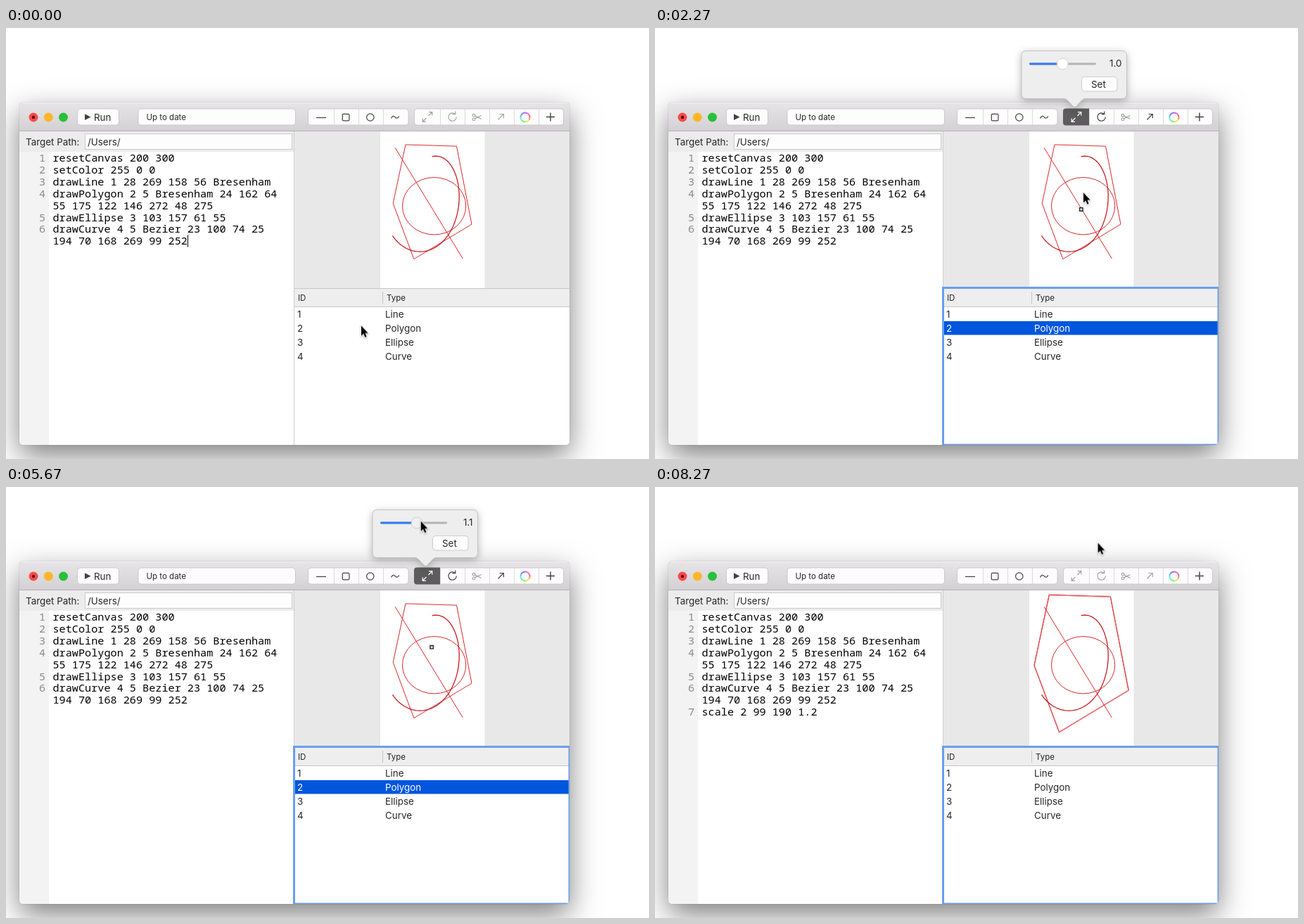
Write an HTML page that moves like this. It is 914 px wide and 613 px high and loops after 8940 ms.

```html
<!DOCTYPE html>
<html lang="en">
<head>
<meta charset="utf-8">
<title>Drawing script editor</title>
<style>
  html, body { margin: 0; width: 100%; height: 100%; overflow: hidden; background: #fff; }
  .window {
    position: absolute; left: 19px; top: 106px; width: 782px; height: 487px;
    border-radius: 5px; background: #fff;
    box-shadow: 0 0 1px rgba(0,0,0,.55), 0 15px 42px rgba(0,0,0,.5);
  }
  svg { position: absolute; left: 0; top: 0; display: block; }
  text { font: 13.4px Inter, "Open Sans", sans-serif; fill: #262626; white-space: pre; }
  .small { font-size: 11.5px; }
  .code text { font: 15.2px "Noto Sans Mono", "DejaVu Sans Mono", monospace; fill: #000; }
  .code .num { fill: #8a8a8a; text-anchor: end; }
  .box { fill: #fdfdfd; stroke: #c3c1c3; stroke-width: .8; }
  .icon { fill: none; stroke: currentColor; stroke-width: 1.2; color: #404040; }
  .off { color: #a3a3a3; }
  .red { fill: none; stroke: #d7262b; }
  .red * { vector-effect: non-scaling-stroke; }
  .end { text-anchor: end; }

  /* 1% = 89.4 ms */
  .a { animation: 8940ms step-end infinite; }
  .caret { animation-name: caret; }
  .row { animation-name: row; }
  .rowText text { fill: currentColor; }
  .rowText { animation-name: rowText; }
  .tool { animation-name: tool; }
  .scaleTool { animation-name: scaleTool; }
  .pressed { animation-name: pressed; }
  .before { animation-name: before; }
  .after { animation-name: after; }
  .v0 { animation-name: v0; }
  .v1 { animation-name: v1; }
  .v2 { animation-name: v2; }
  .set { animation-name: set; }
  .knob { animation: grab 8940ms step-end infinite, slide 8940ms ease-out infinite; }
  .ring { animation: ring 8940ms ease-out infinite; }
  .popover { animation: popover 8940ms linear infinite; transform-origin: 597px 113px; }
  .handle { animation: handle 8940ms ease-in-out infinite, pressed 8940ms step-end infinite; }
  .cursor { animation: cursor 8940ms ease-in-out infinite; }

  @keyframes caret { 0% { opacity: 1 } 1.45%, 100% { opacity: 0 } }
  @keyframes row { 0% { opacity: 0 } 4.47% { opacity: 1 } 83.5%, 100% { opacity: 0 } }
  @keyframes rowText { 0% { color: #262626 } 4.47% { color: #fff } 83.5%, 100% { color: #262626 } }
  @keyframes tool { 0% { color: #a3a3a3 } 4.47% { color: #404040 } 83.5%, 100% { color: #a3a3a3 } }
  @keyframes scaleTool {
    0% { color: #a3a3a3 } 4.47% { color: #404040 } 18.6% { color: #fff } 83.5%, 100% { color: #a3a3a3 }
  }
  @keyframes pressed { 0% { opacity: 0 } 18.6% { opacity: 1 } 83.5%, 100% { opacity: 0 } }
  @keyframes before { 0% { opacity: 1 } 83.5%, 100% { opacity: 0 } }
  @keyframes after { 0% { opacity: 0 } 83.5%, 100% { opacity: 1 } }
  @keyframes v0 { 0% { opacity: 1 } 61.9%, 100% { opacity: 0 } }
  @keyframes v1 { 0% { opacity: 0 } 61.9% { opacity: 1 } 66.8%, 100% { opacity: 0 } }
  @keyframes v2 { 0% { opacity: 0 } 66.8%, 100% { opacity: 1 } }
  @keyframes set { 0% { opacity: 0 } 82.6%, 100% { opacity: 1 } }
  @keyframes grab { 0% { fill: #fff } 60.35% { fill: #f0f0f0 } 72.3%, 100% { fill: #fff } }
  @keyframes slide {
    0%, 60.35% { transform: translate(579.3px, 51px) }
    63.42% { transform: translate(584px, 51px) }
    70.1%, 100% { transform: translate(585.7px, 51px) }
  }
  @keyframes ring {
    0%, 4.4% { opacity: 0; stroke-width: 22px }
    7.5%, 100% { opacity: 1; stroke-width: 3px }
  }
  @keyframes popover {
    0%, 18.6% { opacity: 0; transform: scale(.6) }
    20.1% { opacity: 1; transform: scale(1.05) }
    21.4%, 83.5% { opacity: 1; transform: none }
    85%, 100% { opacity: 0; transform: none }
  }
  @keyframes handle {
    0%, 31.5% { transform: translate(605.8px, 258px) }
    41.05%, 43% { transform: translate(605.4px, 221.3px) }
    46.98%, 100% { transform: translate(605.2px, 227.7px) }
  }
  @keyframes cursor {
    0%, 9.2% { transform: translate(505px, 423.5px) }
    15.6%, 20.5% { transform: translate(602.4px, 125px) }
    25.39% { transform: translate(609px, 234px); animation-timing-function: ease-out }
    28.5%, 31.5% { transform: translate(606px, 258px) }
    41.05%, 43% { transform: translate(605.6px, 220.5px) }
    46.98%, 49.5% { transform: translate(605.4px, 226.9px) }
    59.6%, 60.35% { transform: translate(585px, 48.6px); animation-timing-function: ease-out }
    63.42% { transform: translate(589.7px, 48.6px); animation-timing-function: ease-out }
    70.1%, 75% { transform: translate(591.4px, 49px) }
    82%, 99.99% { transform: translate(629.6px, 79.5px) }
    100% { transform: translate(505px, 423.5px) }
  }
</style>
</head>
<body>
<div class="window"></div>
<svg width="914" height="613" viewBox="0 0 914 613">
  <defs>
    <linearGradient id="bar" x2="0" y2="1"><stop stop-color="#e7e5e7"/><stop offset="1" stop-color="#d2d0d2"/></linearGradient>
    <linearGradient id="blue" x2="0" y2="1"><stop stop-color="#4a97f9"/><stop offset="1" stop-color="#0a5ae0"/></linearGradient>
    <clipPath id="frame"><rect x="19" y="106" width="782" height="487" rx="5"/></clipPath>
  </defs>

  <g clip-path="url(#frame)">
    <rect x="19" y="106" width="782" height="41" fill="url(#bar)"/>
    <path d="M19 106.5H801" stroke="#f3f2f3"/>
    <path d="M19 146.5H801" stroke="#b4b2b4"/>

    <!-- script side -->
    <rect x="19" y="147" width="391" height="29" fill="#ececec"/>
    <text x="28" y="166.5">Target Path:</text>
    <rect class="box" x="112.5" y="150.5" width="294" height="22"/>
    <text x="116" y="166.5">/Users/</text>
    <rect x="19" y="176" width="42" height="417" fill="#f3f3f3"/>
    <g class="code" id="code"></g>
    <path class="a caret" d="M258.5 294.5V311.5" stroke="#000"/>

    <!-- canvas -->
    <rect x="410" y="147" width="391" height="223" fill="#e8e8e8"/>
    <rect x="532" y="147" width="148.500" height="223" fill="#fff"/>
    <g class="red" transform="translate(532.4 369.4) scale(.74 -.74)">
      <path d="M28 269L158 56"/>
      <path id="poly" class="a before" d="M24 162L64 55 175 122 146 272 48 275Z"/>
      <g class="a after"><use href="#polyBig"/>
        <path id="polyBig" d="M24 162L64 55 175 122 146 272 48 275Z"
          transform="translate(99 190) scale(1.2) translate(-99 -190)"/></g>
      <ellipse cx="103" cy="157" rx="61" ry="55"/>
      <path id="curve" stroke="#c4151b" stroke-width="1.25"/>
    </g>

    <!-- table -->
    <rect x="410" y="370" width="391" height="223" fill="#fff"/>
    <rect x="410" y="371" width="391" height="25" fill="#eee"/>
    <path d="M410 370.5H801M410 396.500H801M535.500 375V392" stroke="#c6c6c6"/>
    <path d="M409.500 147V593" stroke="#cfcfcf"/>
    <text class="small" x="415" y="387.500">ID</text>
    <text class="small" x="541" y="387.500">Type</text>
    <rect class="a row" x="410" y="417" width="391" height="19.500" fill="#0056dc"/>
    <g id="rows"></g>
    <rect class="ring" x="409.500" y="369.500" width="391.500" height="223.500" fill="none" stroke="#6a9eee"/>
  </g>

  <!-- title bar -->
  <circle cx="39" cy="127" r="6.500" fill="#fc4a48"/><circle cx="39" cy="127" r="2.200" fill="#5a0406"/>
  <circle cx="60.300" cy="127" r="6.500" fill="#fdb629"/>
  <circle cx="81.500" cy="127" r="6.500" fill="#27c13b"/>
  <rect class="box" x="101.500" y="115" width="59" height="23" rx="4"/>
  <path d="M112 122.300L120.500 126.700 112 131Z" fill="#404040"/>
  <text x="125" y="131.500">Run</text>
  <rect class="box" x="188" y="115" width="223.500" height="23" rx="4"/>
  <text class="small" x="199.500" y="131">Up to date</text>
  <rect class="box" x="429.500" y="115" width="142.500" height="23" rx="4"/>
  <rect class="box" x="580.500" y="115" width="212" height="23" rx="4"/>
  <path d="M466.500 115v23M501.500 115v23M536.500 115v23M617.500 115v23M652.500 115v23M687.500 115v23M722.500 115v23M757.500 115v23"
    stroke="#d3d1d3" stroke-width=".8"/>
  <path class="a pressed" d="M617 114.500V138.500H584a4 4 0 0 1-4-4V118.500a4 4 0 0 1 4-4Z" fill="#5c5c5c"/>
  <g class="icon">
    <path d="M441 127.500H455"/>
    <rect x="478.300" y="122.300" width="9.600" height="9.600" rx="1.500"/>
    <circle cx="517.800" cy="127" r="5.200"/>
    <path d="M547.500 128.500c2-4 4-3.600 5.800-1.600s3.800 2 5.400-1.400"/>
    <path d="M768 126.500H780M774 120.500V132.500" stroke-width="1.400"/>
  </g>
  <path class="icon a scaleTool" d="M600.500 125l5-5M601 119.700h4.800v4.800M597.500 128l-5 5M592.200 128.500v4.800h4.800"/>
  <path class="icon a tool" d="M640.300 126.500a5.700 5.700 0 1 1-2-4.300M638.800 118.500v4.200h-4.200"/>
  <g class="icon off">
    <circle cx="665" cy="124.200" r="1.800"/><circle cx="665" cy="129.800" r="1.800"/>
    <path d="M666.600 125.100L675.500 129.500M666.600 128.900L675.500 124.500"/>
  </g>
  <path class="icon a tool" d="M699.500 130.500l7.500-7.800M701.500 122.500h5.800v5.800"/>
  <g id="wheel" fill="none" stroke-width="2"></g>

  <rect class="handle" x="-2.200" y="-2.200" width="4.400" height="4.400" fill="#fff" stroke="#000" stroke-width="1.300"/>

  <g class="popover">
    <path d="M527 32.500H664.500a6 6 0 0 1 6 6V94.500a6 6 0 0 1-6 6H612c-3 0-4.500 1.500-6 3L599 111c-1.500 1.700-3.500 1.700-5 0L587 103.500c-1.500-1.500-3-3-6-3H527a6 6 0 0 1-6-6V38.500a6 6 0 0 1 6-6Z"
      fill="#eee" stroke="#b9b9b9" stroke-width=".8" style="filter:drop-shadow(0 3px 6px rgba(0,0,0,.28))"/>
    <rect x="532" y="49.600" width="95" height="2.800" rx="1.400" fill="#b4b4b4"/>
    <rect x="532" y="49.600" width="50" height="2.800" rx="1.400" fill="#377df7"/>
    <circle class="knob" r="8" stroke="#c4c4c4" stroke-width=".8"/>
    <text class="end a v0" x="663.500" y="55">1.0</text>
    <text class="end a v1" x="663.500" y="55">1.1</text>
    <text class="end a v2" x="663.500" y="55">1.2</text>
    <rect class="box" x="606.500" y="69.500" width="50.500" height="20.500" rx="4"/>
    <text x="620" y="84.500">Set</text>
    <g class="a set">
      <rect x="606" y="69" width="51.500" height="21.500" rx="4" fill="url(#blue)"/>
      <text x="620" y="84.500" style="fill:#fff">Set</text>
    </g>
  </g>

  <path class="cursor" d="M0 0V14.300L3.200 11.300 5.500 16.500 7.700 15.500 5.500 10.400H9.700Z" stroke="#fff" stroke-width="1.700"
    paint-order="stroke" style="filter:drop-shadow(0 1px 1px rgba(0,0,0,.3))"/>
</svg>
<script>
  const ns = 'http://www.w3.org/2000/svg';
  function add(id, tag, attrs, label = '') {
    const el = document.createElementNS(ns, tag);
    for (const key in attrs) el.setAttribute(key, attrs[key]);
    el.textContent = label;
    document.getElementById(id).append(el);
    return el;
  }

  // an indented line continues the one above
  const script = [
    'resetCanvas 200 300',
    'setColor 255 0 0',
    'drawLine 1 28 269 158 56 Bresenham',
    'drawPolygon 2 5 Bresenham 24 162 64',
    ' 55 175 122 146 272 48 275',
    'drawEllipse 3 103 157 61 55',
    'drawCurve 4 5 Bezier 23 100 74 25',
    ' 194 70 168 269 99 252',
    'scale 2 99 190 1.2'
  ];
  let num = 0;
  script.forEach((line, i) => {
    const y = 190.2 + i * 16.87;
    const late = i === script.length - 1 ? 'a after' : '';
    if (line[0] !== ' ') add('code', 'text', { x: 56, y, class: 'num ' + late }, ++num);
    add('code', 'text', { x: 66.5, y, class: late }, line.trim());
  });

  ['Line', 'Polygon', 'Ellipse', 'Curve'].forEach((type, i) => {
    const id = 'row' + i;
    const y = 411.7 + i * 20;
    add('rows', 'g', { id, class: i === 1 ? 'a rowText' : '' });
    add(id, 'text', { x: 414, y }, i + 1);
    add(id, 'text', { x: 539, y }, type);
  });

  // Bezier of any degree by repeated interpolation
  function bezier(pts, t) {
    while (pts.length > 1) {
      pts = pts.slice(1).map((p, i) => p.map((v, k) => pts[i][k] + (v - pts[i][k]) * t));
    }
    return pts[0];
  }
  const ctrl = [[23, 100], [74, 25], [194, 70], [168, 269], [99, 252]];
  const dots = Array.from({ length: 81 }, (_, i) => bezier(ctrl, i / 80).map(v => v.toFixed(2)));
  document.getElementById('curve').setAttribute('d', 'M' + dots.join('L'));

  for (let i = 0; i < 12; i++) {
    add('wheel', 'path', {
      d: 'M744.5 127A6.5 6.5 0 0 1 743.63 130.25',
      stroke: `hsl(${i * 30 + 20} 85% 68%)`,
      transform: `rotate(${i * 30} 738 127)`
    });
  }
</script>
</body>
</html>
```
